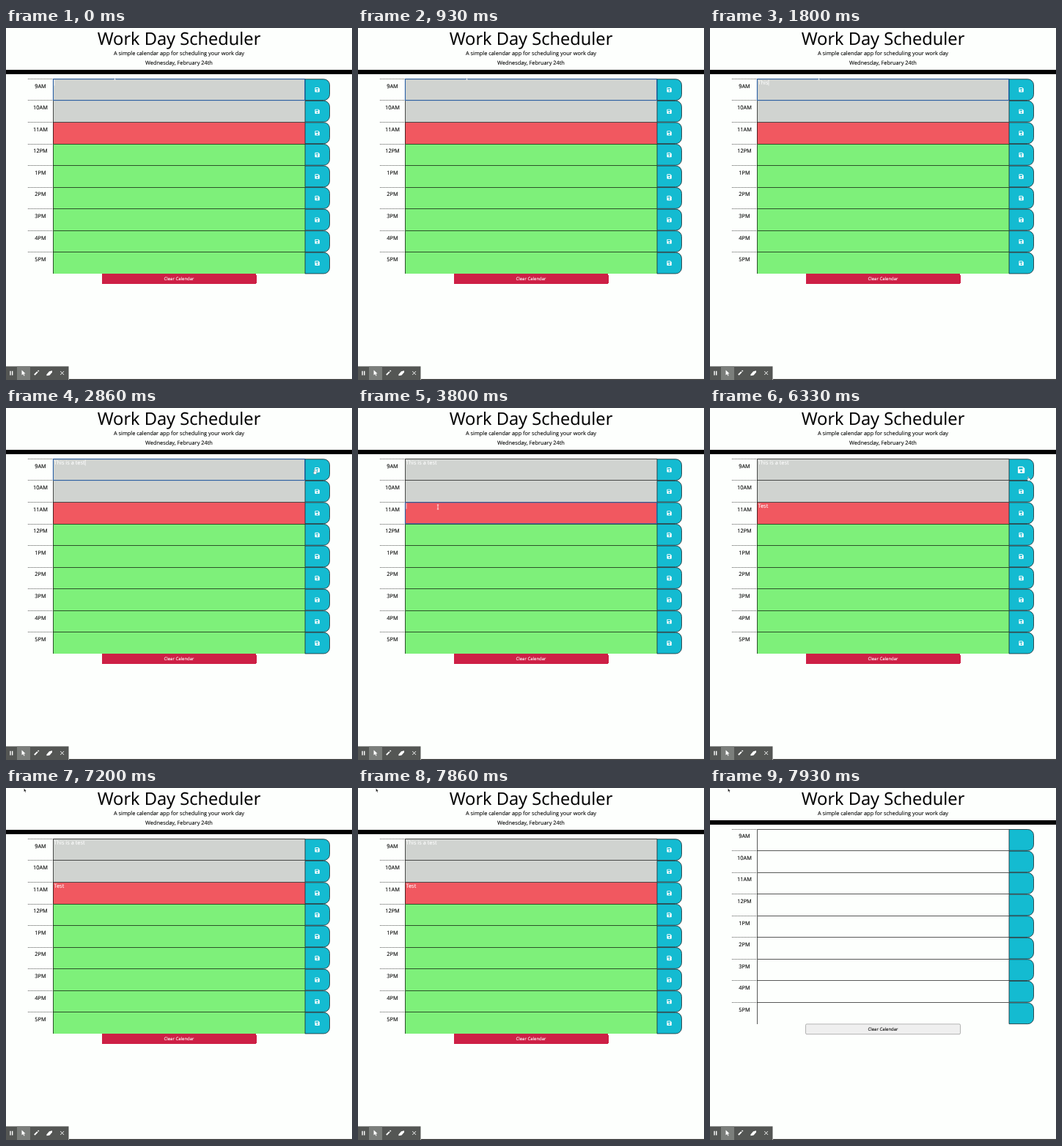
These frames come from a looping animation (472x480 px, 8 s). An HTML page:

```html
<!DOCTYPE html>
<html lang="en">
<head>
<meta charset="utf-8">
<title>Work Day Scheduler</title>
<style>
  html, body { margin: 0; width: 100%; height: 100%; overflow: hidden; background: #fdfffd; }
  svg { display: block; width: 472px; height: 480px; font: 7.4px "Open Sans", sans-serif; }
  text { text-rendering: geometricPrecision; fill: currentColor; stroke: currentColor; stroke-width: .1; }
  .mid { text-anchor: middle; }
  .line { fill: none; stroke: #000; stroke-opacity: .65; }
  .line, .slot, .clear { shape-rendering: crispEdges; }
  .past { fill: #d0d3d0; }
  .present { fill: #f15860; }
  .future { fill: #7ef07a; }
  .save { fill: #14bbd1; stroke: #17282c; stroke-width: .8; }
  .clear { fill: #cd2045; }
  .clear + text { color: #fff; font-size: 6px; }
  .entry { color: #fff; }
  .loading .slot { fill: none; }
  .loading .icon, .loading .entry, .loading #date { display: none; }
  .loading .clear { fill: #efefef; stroke: #858585; stroke-width: .6; shape-rendering: auto; }
  .loading .clear + text { color: #111; }
</style>
</head>
<body>
<svg id="stage" viewBox="0 0 472 480"></svg>
<script>
const LOOP = 8000, STEP = LOOP / 120, RELOAD_STEP = 119;
const TOP = 69.4, PITCH = 29.55, HEADER_SHIFT = -13.3;
const HOURS = ["9AM", "10AM", "11AM", "12PM", "1PM", "2PM", "3PM", "4PM", "5PM"];
const stage = document.getElementById("stage");
const get = id => document.getElementById(id);

const kind = i => i < 2 ? "past" : i === 2 ? "present" : "future";
const rowTop = i => TOP + i * PITCH;
const iconPlace = i => `translate(424.6 ${rowTop(i) + 14.9})`;

function row(hour, i) {
  const y = rowTop(i), bottom = y + PITCH;
  return `
    <rect class="slot ${kind(i)}" x="64" y="${y}" width="344" height="${PITCH}"/>
    <path class="line" d="M64 ${y}H408M64.4 ${y}V${bottom}"/>
    <path class="line" d="M30 ${y}H64" stroke-dasharray="1 1"/>
    <text class="mid" x="47" y="${y + 12.3}">${hour}</text>
    <path class="save" d="M408 ${y + .4}H433.5a8 8 0 0 1 8 8V${bottom - 8.4}a8 8 0 0 1 -8 8H408Z"/>
    <g class="icon" id="icon${i}" transform="${iconPlace(i)}">
      <path fill="#fff" fill-rule="evenodd" d="M-2.5 -3.2H1.5L3.2 -1.5V2.5q0 .7 -.7 .7H-2.5q-.7 0 -.7 -.7V-2.5q0 -.7 .7 -.7Z
        M-2.2 -2.3V-.5H1.3V-2.3Z M0 .3a1 1 0 1 0 .01 0Z"/>
    </g>`;
}

stage.innerHTML = `
  <text class="mid" x="236" y="22.8" font-size="23.7">Work Day Scheduler</text>
  <text class="mid" x="236" y="37.2">A simple calendar app for scheduling your work day</text>
  <text class="mid" x="236" y="50.3" id="date">Wednesday, February 24th</text>
  <g id="page">
    <rect class="line" style="fill:#000;stroke:none" y="57.4" width="472" height="5.8"/>
    ${HOURS.map(row).join("")}
    <rect class="clear" x="130.5" y="335.2" width="211" height="13.8" rx="1.5"/>
    <text class="mid" x="236" y="344.4">Clear Calendar</text>
    <text class="entry" id="first" x="65.4" y="${rowTop(0) + 7.2}"></text>
    <text class="entry" id="second" x="65.4" y="${rowTop(2) + 7.2}"></text>
    <rect id="focus" x="64.4" width="343.2" height="${PITCH - .6}" fill="none" stroke="#2a64b0"/>
    <rect id="caret" width=".7" height="8" fill="#fff"/>
  </g>
  <rect x="86" y="478.8" width="386" height="1.2" fill="#222"/>
  <rect y="461.4" width="85.5" height="18.6" fill="#545654"/>
  <rect x="15" y="461.4" width="18" height="18.6" fill="#7b7e7b"/>
  <g stroke="#fff" stroke-width="1.4" fill="none">
    <path d="M6 467.8V473.4M8.7 467.8V473.4"/>
    <path d="M38.8 473L43 468.8M43.7 468.1L44.7 467.1" stroke-width="1.9"/>
    <path d="M74.3 468.2L78.9 472.8M78.9 468.2L74.3 472.8" stroke-width="1"/>
  </g>
  <path fill="#fff" d="M21.5 466.5L26.5 471.2 24.3 471.4 25.5 474 24.5 474.5 23.3 471.9 21.5 473.3Z
    M55.3 472.5L59 468.3 63 467.3V469.5L59.5 473.4 55.5 474.3Z"/>
  <g id="pointer">
    <path id="beam" d="M-1.2 -3H1.2M0 -3V3M-1.2 3H1.2" stroke="#fff" stroke-width=".8"/>
    <path id="hand" d="M-.5 -1.5q.6 -.7 1 0V.5L3 1.2V3.3L2.2 4.5H-.2L-1.7 2.2 -1.2 1.7 -.5 2.3Z" fill="#fff" stroke="#345" stroke-width=".3"/>
    <path id="arrow" d="M0 0V4.6L1.1 3.7 1.9 5.4 2.7 5 1.9 3.4H3.2Z" fill="#111" stroke="#fff" stroke-width=".3"/>
  </g>`;

// Pointer stops: time, x, y
const PATH = [
  [0, 148.5, 67.5], [2450, 148.5, 67.5], [2900, 425, 86], [3350, 425, 86],
  [3620, 109, 135], [4700, 109, 135], [5130, 408.5, 144], [5350, 425, 144],
  [5700, 425, 144], [6100, 434, 95], [6400, 434, 95], [6520, 443, 92],
  [6900, 11, 20], [7100, 24.5, .5], [LOOP, 24.5, .5]
];
const ENTRIES = [
  { id: "first", row: 0, text: "This is a test", focus: 0, start: 1500, key: 85, blur: 3050 },
  { id: "second", row: 2, text: "Test", focus: 3650, start: 4200, key: 85, blur: 5480 }
];
const HOVERS = [
  { row: 0, from: 2820, to: 3400 },
  { row: 2, from: 5200, to: 5820 },
  { row: 0, from: 5980, to: 6510 }
];

const clamp = v => Math.min(1, Math.max(0, v));
const ease = v => v * v * (3 - 2 * v);
const show = (id, on) => get(id).setAttribute("visibility", on ? "visible" : "hidden");

function pointerAt(t) {
  const i = PATH.findIndex(p => p[0] > t);
  const [t0, x0, y0] = PATH[i - 1], [t1, x1, y1] = PATH[i];
  const k = ease((t - t0) / (t1 - t0));
  return [x0 + (x1 - x0) * k, y0 + (y1 - y0) * k];
}

function drawEntry(entry, t) {
  const count = Math.min(entry.text.length, Math.max(0, Math.floor((t - entry.start) / entry.key) + 1));
  const label = get(entry.id);
  label.textContent = entry.text.slice(0, count);
  if (t < entry.focus || t >= entry.blur) return false;

  const y = rowTop(entry.row);
  const lastKey = count ? entry.start + (count - 1) * entry.key : entry.focus;
  get("focus").setAttribute("y", y + .3);
  get("caret").setAttribute("x", 65.6 + (count ? label.getComputedTextLength() : 0));
  get("caret").setAttribute("y", y + 1.2);
  show("caret", (t - lastKey) % 1000 < 500);
  return true;
}

function drawIcon(i, t) {
  const hover = HOVERS.find(h => h.row === i && t >= h.from && t < h.to);
  const scale = hover ? 1 + .45 * ease(clamp((t - hover.from) / 250)) : 1;
  get("icon" + i).setAttribute("transform", `${iconPlace(i)} scale(${scale})`);
}

function draw(now) {
  const step = Math.floor(((now + 7) % LOOP) / STEP);
  const t = step * STEP, loading = step >= RELOAD_STEP;
  stage.classList.toggle("loading", loading);
  get("page").setAttribute("transform", `translate(0 ${loading ? HEADER_SHIFT : 0})`);

  const focused = ENTRIES.map(entry => drawEntry(entry, t)).some(Boolean);
  show("focus", focused);
  if (!focused) show("caret", false);
  HOURS.forEach((_, i) => drawIcon(i, t));

  const [x, y] = pointerAt(t);
  get("pointer").setAttribute("transform", `translate(${x} ${y})`);
  const overSave = x > 410 && x < 442 && y > TOP;
  const overText = !overSave && t < 5400;
  show("hand", overSave);
  show("beam", overText);
  show("arrow", !overSave && !overText);
}

const start = performance.now();
function tick() {
  draw(performance.now() - start);
  requestAnimationFrame(tick);
}
tick();
</script>
</body>
</html>
```
